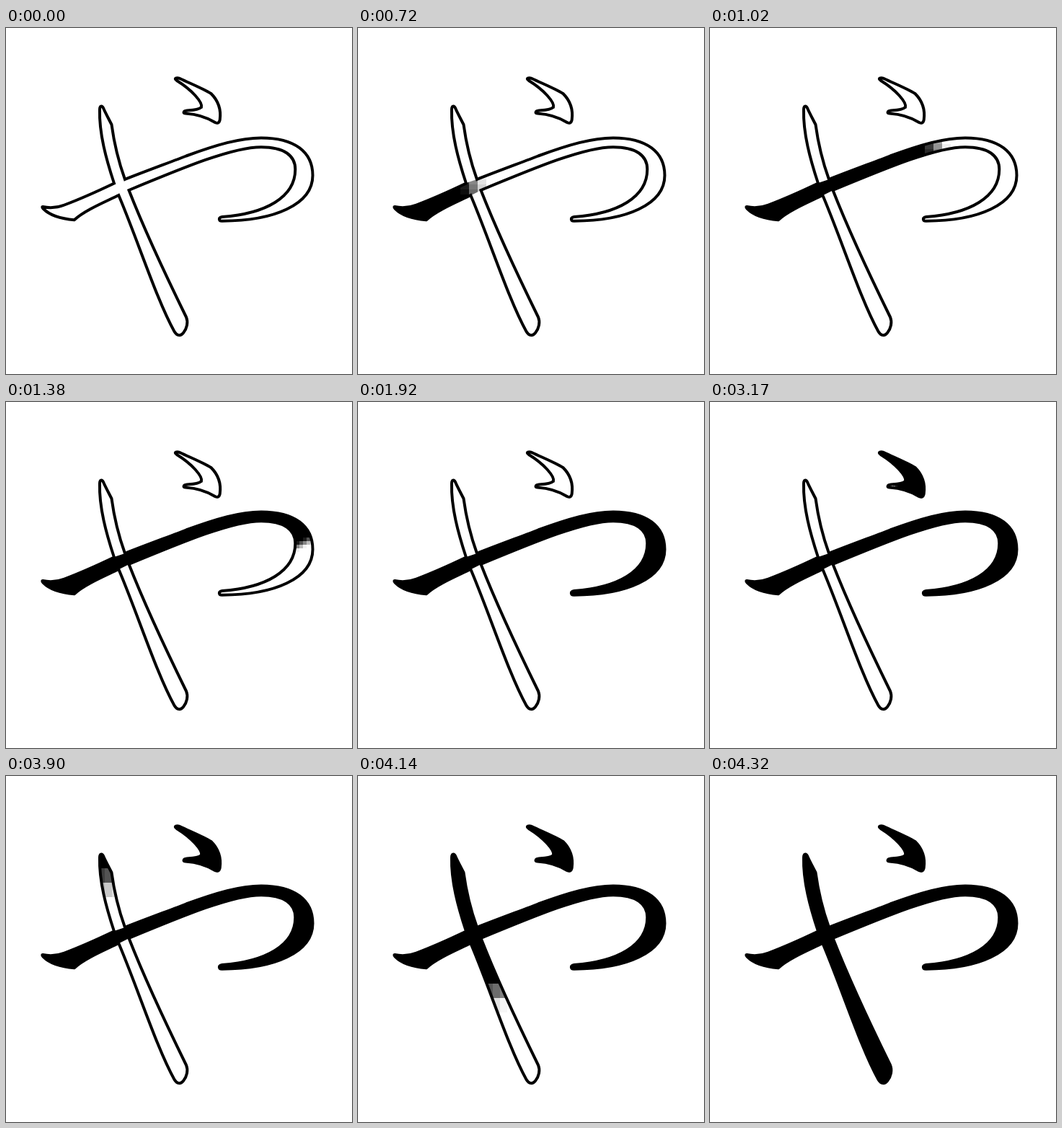
These frames come from a looping animation (480 by 480 pixels, 4.78 s). An HTML page with a canvas:

```html
<!DOCTYPE html>
<html lang="ja">
<head>
<meta charset="utf-8">
<title>や</title>
<style>
  html, body { margin: 0; width: 100%; height: 100%; overflow: hidden; background: #fff; }
  canvas { display: block; width: 480px; height: 480px; }
</style>
</head>
<body>
<canvas id="stage" width="480" height="480"></canvas>
<script>
const ctx = document.getElementById('stage').getContext('2d');
const LOOP = 4780, STEP = 60;

const glyph = new Path2D(`
  M51 248 C60 250 72 249 81 245.5 C105 236.5 128 226 150 215.5
  C139 182 129 146 130 113 C130 108 133 107 135 111 C138 118 143 127 146.5 134
  C150 160 156 185 165 210
  C190 200 235 183.5 250 177.5 C292 162 325 152.4 354 152.4
  C400 152.4 425.5 171.5 425.5 204.5 C425.5 245 372 267.7 300 267.7
  C295 268 294 263 300 262 C360 257.5 401.3 235 401.3 196
  C401.3 177 386 165.2 354 165.2 C315 165.2 250 192 170.5 225
  C190 275 225 350 250 401 C253 408 251 417 246 423
  C242 428 237 427 233.5 421 C209 377 183 295 156.3 232
  C137 241.5 109 253 94.7 266.3 C80 265 62 261 52 251 C50 249 50 248 51 248 Z
  M235 71 C234 69 238 69 241 70 C258 78 275 85 284.5 91
  C295.5 102 298.5 115 296.7 127.5 C295.5 132.5 293 132.5 290 131
  C278 123.5 264 119.5 249 118.5 C245 118.5 246 115 251 114.5
  C258 114 266 114 271 110 C273 103 258 86 237 73 Z`);

// start, steps: timing; dir: ink direction; front, gap: ink edge and its advance
// cell: soft edge block size; box: x, y, w, h; area: region that takes the ink
const parts = [
  { start: 600, steps: 9, dir: [.958, -.287], front: 10, gap: 32.4, cell: [12, 7],
    box: [46, 140, 336, 140],
    area: 'M40 200 150 215 165 210 300 140 380 147 340 171 330 200 171 225 157 232 100 300 40 300Z' },
  { start: 1140, steps: 9, dir: [.45, .89], front: 313, gap: 10.5, cell: [5, 5],
    box: [327, 143, 105, 115],
    area: 'M330 140H440V270L408 244 388 228 330 200Z' },
  { start: 1680, steps: 5, dir: [-.95, .3], front: -292, gap: 22, cell: [7, 4],
    box: [290, 222, 130, 50],
    area: 'M285 222H380L396 222 430 250V280H285Z' },
  { start: 2450, steps: 9, dir: [.6, .8], front: 209.5, gap: 9.1, cell: [4, 4],
    box: [230, 64, 72, 72],
    area: 'M225 60H310V140H296L270 111 225 100Z' },
  { start: 2990, steps: 5, dir: [-.99, -.1], front: -293, gap: 8.2, cell: [3, 3],
    box: [242, 108, 60, 27],
    area: 'M240 108H300V138H240Z' },
  { start: 3900, steps: 8, dir: [.35, .94], front: 166, gap: 41, cell: [10, 20],
    box: [117, 88, 150, 360],
    area: 'M110 90H160L290 445H215Z' }
];
for (const p of parts) p.area = new Path2D(p.area);

function ink({ start, steps, dir, front, gap, cell: [w, h], box, area }, time) {
  const k = Math.floor((time - start) / STEP + 1e-4);
  if (k < 0) return;
  const [x0, y0, bw, bh] = box;
  ctx.save();
  ctx.clip(glyph);
  ctx.clip(area);
  if (k >= steps - 1) {
    ctx.fillRect(x0, y0, bw, bh);
  } else {
    const edge = front + k * gap;
    for (let y = y0; y < y0 + bh; y += h) {
      for (let x = x0; x < x0 + bw; x += w) {
        const along = (x + w / 2) * dir[0] + (y + h / 2) * dir[1];
        const alpha = Math.min(1, 1 - (along - edge) / gap);
        if (alpha <= 0) continue;
        ctx.globalAlpha = alpha;
        ctx.fillRect(x, y, w, h);
      }
    }
  }
  ctx.restore();
}

function draw() {
  const time = performance.now() % LOOP;
  ctx.fillStyle = '#fff';
  ctx.fillRect(0, 0, 480, 480);
  ctx.fillStyle = ctx.strokeStyle = '#000';
  for (const p of parts) ink(p, time);
  ctx.lineWidth = 4;
  ctx.stroke(glyph);
  requestAnimationFrame(draw);
}
draw();
</script>
</body>
</html>
```
